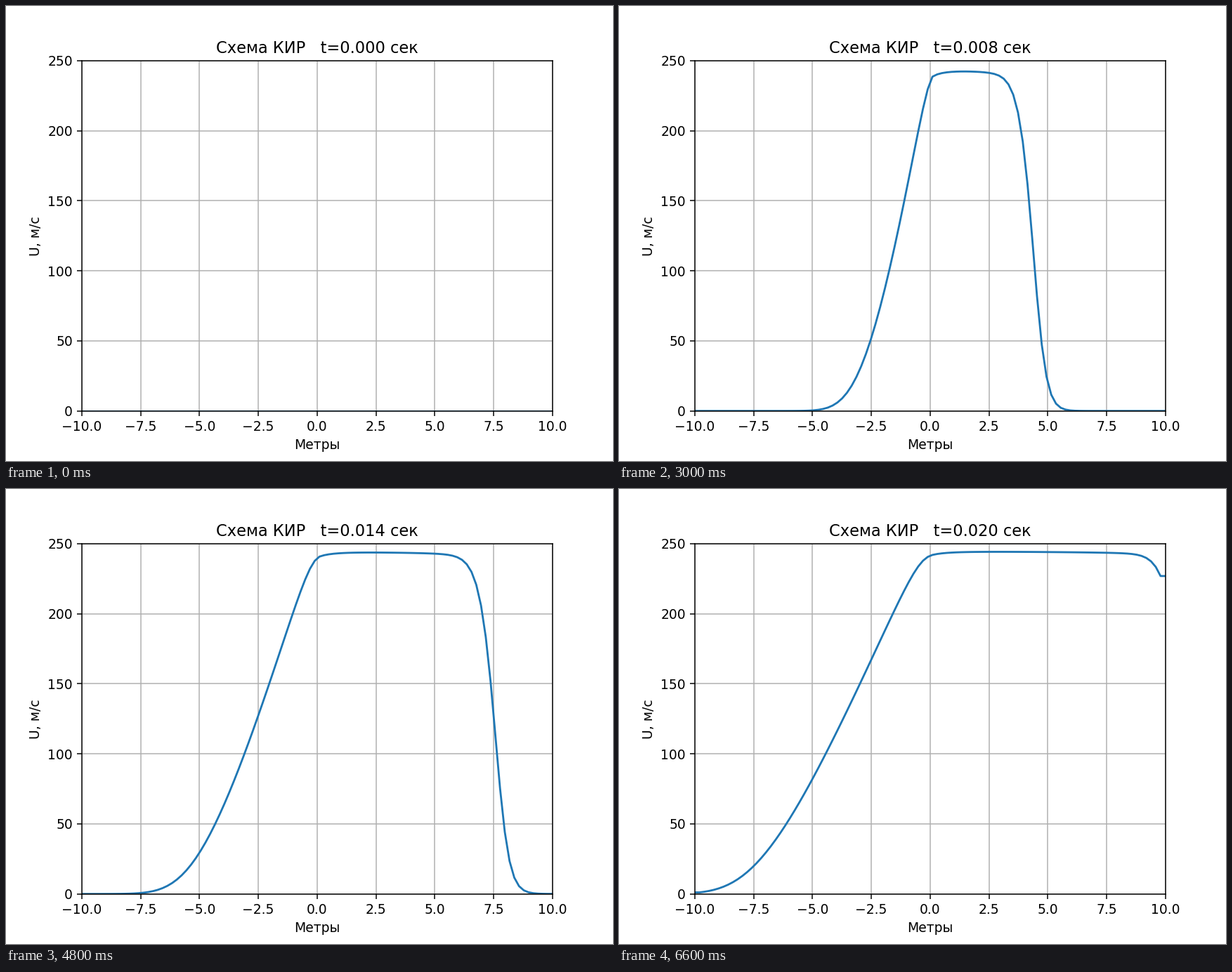
These frames come from a looping animation (864x648 px, 6.9 s). A matplotlib script:

```python
import numpy as np
import matplotlib.pyplot as plt
from matplotlib.animation import FuncAnimation

# Shock tube solved with the Courant-Isaacson-Rees upwind scheme
GAMMA = 5 / 3
ATM = 101325.0
HALF_LENGTH = 10.0
NODES = 100
TAU = 1e-5
STEPS_PER_MS = 100
LAST_MS = 20

x = np.linspace(-HALF_LENGTH, HALF_LENGTH, NODES)
h = x[1] - x[0]


def initial_state():
    """Rows of (rho, rho*u, rho*e): dense gas on the left, both sides at rest."""
    left = x <= 0
    rho = np.where(left, 13.0, 1.3)
    pressure = np.where(left, 10 * ATM, ATM)
    return np.stack([rho, np.zeros(NODES), pressure / (GAMMA - 1)], axis=-1)


def advance(w):
    rho, momentum, energy = w[1:-1].T
    u = momentum / rho
    c = np.sqrt(GAMMA * (GAMMA - 1) * energy / rho)
    zero = np.zeros_like(u)
    g = np.full_like(u, GAMMA - 1)

    # left eigenvectors and their speeds
    omega = np.stack([
        np.stack([-u * c, c, g], axis=-1),
        np.stack([-c * c, zero, g], axis=-1),
        np.stack([u * c, -c, g], axis=-1),
    ], axis=1)
    speed = np.stack([u + c, u, u - c], axis=-1)[..., None]

    diff = np.diff(w, axis=0)[..., None]
    upwind = (np.maximum(speed, 0) * (omega @ diff[:-1])
              + np.minimum(speed, 0) * (omega @ diff[1:]))

    new = w.copy()
    new[1:-1] -= TAU / h * np.linalg.solve(omega, upwind)[..., 0]
    new[0], new[-1] = new[1], new[-2]
    return new


def solve(marks):
    """Velocity profiles after the given numbers of time steps."""
    w = initial_state()
    profiles = []
    for n in range(marks[-1] + 1):
        if n in marks:
            profiles.append(w[:, 1] / w[:, 0])
        w = advance(w)
    return profiles


# One snapshot per millisecond; two of them are followed by the very next step
marks = sorted([STEPS_PER_MS * ms for ms in range(LAST_MS + 1)]
               + [STEPS_PER_MS * ms + 1 for ms in (1, 8)])
profiles = solve(marks)

fig, ax = plt.subplots(figsize=(6.4, 4.8), dpi=135)
line, = ax.plot(x, profiles[0])
title = ax.set_title("")
ax.set_xlim(-HALF_LENGTH, HALF_LENGTH)
ax.set_ylim(0, 250)
ax.set_xlabel("Метры")
ax.set_ylabel("U, м/с")
ax.grid()


def update(i):
    line.set_ydata(profiles[i])
    title.set_text(f"Схема КИР   t={marks[i] * TAU:.3f} сек")
    return line, title


anim = FuncAnimation(fig, update, frames=len(marks), interval=300, repeat=True)
plt.show()
```
